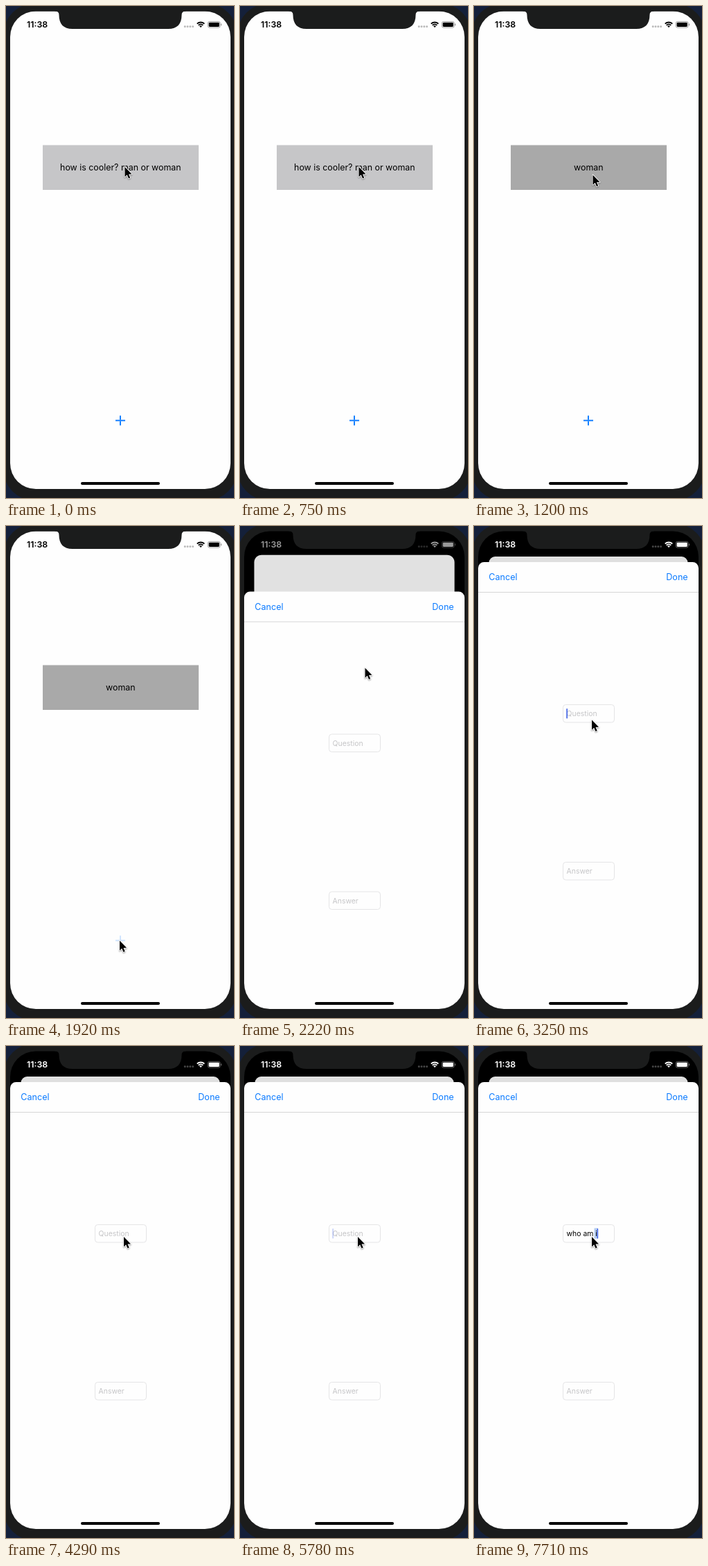
Recreate the animation shown at these times as an HTML page with a canvas. Size 329 px wide and 709 px high, loop 8 s.

```html
<!DOCTYPE html>
<html lang="en">
<head>
<meta charset="utf-8">
<title>Flashcards</title>
<style>
  html, body { margin: 0; width: 100%; height: 100%; overflow: hidden; background: #1b1c1c; }
  canvas { display: block; width: 329px; height: 709px; }
</style>
</head>
<body>
<canvas id="stage" width="329" height="709"></canvas>
<script>
const ctx = document.getElementById('stage').getContext('2d');
const LOOP = 8000;
const BEZEL = '#1b1c1c', WHITE = '#fefefe', BLUE = '#0a7aff';
const SCREEN = { x: 6, y: 7.5, w: 318, h: 688.5, r: 37 };
const SHEET_TOP = 52, SHEET_TRAVEL = 657;

// Stepped tracks: the last entry that has started applies.
const pointerTrack = [
  [0, 171, 231.5], [1200, 171, 243], [1350, 170, 315], [1500, 168, 430],
  [1650, 165, 540], [1770, 163.5, 590], [1920, 163.5, 597], [2070, 171, 400],
  [2220, 180, 204], [2370, 179, 212], [2520, 175, 240], [2670, 171, 266],
  [2800, 169.5, 277], [2950, 169.5, 279], [3400, 169.5, 276], [3550, 169.5, 274.5]
];
const cardTrack = [[0, false], [150, true], [750, false], [1050, true]];
const caretTrack = [
  [0, 0], [3250, 1], [3550, 0], [3840, 1], [4140, 0.4], [4290, 0],
  [4740, 0.4], [4890, 1], [5190, 0], [5780, 0.3], [5930, 1]
];
const typingTrack = [
  [0, ''], [5930, 'w'], [6380, 'wh'], [6680, 'who'], [6970, 'who '],
  [7120, 'who a'], [7420, 'who am'], [7570, 'who am '], [7710, 'who am i']
];

const at = (track, t) => track.filter(key => key[0] <= t).pop();
const clamp = v => Math.max(0, Math.min(1, v));

function box(x, y, w, h, r, color) {
  ctx.beginPath();
  ctx.roundRect(x, y, w, h, r);
  ctx.fillStyle = color;
  ctx.fill();
}

function label(text, x, y, size, color, align = 'left', weight = 400) {
  ctx.font = `${weight} ${size}px Inter, "Open Sans", sans-serif`;
  ctx.textAlign = align;
  ctx.fillStyle = color;
  ctx.fillText(text, x, y);
}

// Critically damped spring
function sheetProgress(t) {
  const s = Math.max(0, t - 1998.5) * 0.02;
  return 1 - Math.exp(-s) * (1 + s);
}

function drawHome(t, progress) {
  const scale = 1 - 0.0975 * progress;
  ctx.save();
  ctx.translate(165, SCREEN.y + 36.5 * progress);
  ctx.scale(scale, scale);
  ctx.translate(-165, -SCREEN.y);
  const radius = progress ? 10 + 27 * (1 - progress) : 0;
  box(SCREEN.x, SCREEN.y, SCREEN.w, SCREEN.h, radius, WHITE);

  const answered = at(cardTrack, t)[1];
  box(53, 200.5, 225, 64.5, 0, answered ? '#a9a9a9' : '#c6c6c8');
  label(answered ? 'woman' : 'how is cooler? man or woman', 165.3, 237.2, 12.4, '#000', 'center');

  ctx.globalAlpha = t >= 1920 ? 0.2 : 1;
  ctx.fillStyle = BLUE;
  ctx.fillRect(158, 596.4, 14, 1.9);
  ctx.fillRect(164, 590.3, 1.9, 6.1);
  ctx.fillRect(164, 598.3, 1.9, 6.1);
  ctx.globalAlpha = 1;

  box(SCREEN.x, SCREEN.y, SCREEN.w, SCREEN.h, radius, `rgba(0,0,0,${0.12 * progress})`);
  ctx.restore();
}

function drawField(y, text, color) {
  ctx.beginPath();
  ctx.roundRect(128.5, y + 0.5, 74, 25.5, 4);
  ctx.lineWidth = 1;
  ctx.strokeStyle = '#e5e5e6';
  ctx.stroke();
  label(text, 133.6, y + 17.3, 10.4, color);
}

function drawSheet(t, top) {
  box(SCREEN.x, top, SCREEN.w, 709, [8.5, 8.5, 0, 0], WHITE);
  ctx.fillStyle = '#d6d6d7';
  ctx.fillRect(SCREEN.x, top + 43, SCREEN.w, 1);
  label('Cancel', 21.3, top + 26.4, 12.6, BLUE);
  label('Done', 308.7, top + 26.4, 12.6, BLUE, 'right');

  const typed = at(typingTrack, t)[1];
  if (t >= 7710) box(173.5, top + 210.5, 5.5, 15, 0, '#b5cdf0');
  drawField(top + 205, typed || 'Question', typed ? '#000' : '#c5c5c7');
  drawField(top + 432, 'Answer', '#c5c5c7');

  ctx.globalAlpha = at(caretTrack, t)[1];
  ctx.font = '400 10.4px Inter, "Open Sans", sans-serif';
  const caretX = 133.3 + ctx.measureText(typed).width;
  box(caretX, top + 211, 1.7, 14.5, 0.8, '#4869e6');
  ctx.globalAlpha = 1;
}

function drawStatus(level) {
  const shade = Math.round(255 * level);
  const ink = `rgb(${shade},${shade},${shade})`;
  label('11:38', 30, 31.2, 12.4, ink, 'left', 600);

  ctx.globalAlpha = 0.27;
  for (let i = 0; i < 4; i++) box(256.8 + i * 3.8, 28.3, 2.8, 2.8, 1, ink);
  ctx.globalAlpha = 1;

  ctx.strokeStyle = ctx.fillStyle = ink;
  const from = -Math.PI * 0.75, to = -Math.PI * 0.25;
  ctx.lineWidth = 1.8;
  for (const r of [4.6, 7.5]) {
    ctx.beginPath();
    ctx.arc(281, 31, r, from, to);
    ctx.stroke();
  }
  ctx.beginPath();
  ctx.moveTo(281, 31);
  ctx.arc(281, 31, 2.6, from, to);
  ctx.fill();

  ctx.globalAlpha = 0.4;
  ctx.lineWidth = 0.9;
  ctx.beginPath();
  ctx.roundRect(291.3, 22.4, 17.8, 8.8, 2.4);
  ctx.stroke();
  box(309.9, 25.3, 1.2, 3, 0.6, ink);
  ctx.globalAlpha = 1;
  box(292.6, 23.7, 15.2, 6.2, 1.3, ink);
}

function drawNotch() {
  ctx.beginPath();
  ctx.moveTo(70, 7);
  ctx.lineTo(71, 7.5);
  ctx.quadraticCurveTo(76.5, 7.5, 76.5, 13);
  ctx.bezierCurveTo(76.5, 26, 83, 33, 96, 33);
  ctx.lineTo(234, 33);
  ctx.bezierCurveTo(247, 33, 253.5, 26, 253.5, 13);
  ctx.quadraticCurveTo(253.5, 7.5, 259, 7.5);
  ctx.lineTo(260, 7);
  ctx.closePath();
  ctx.fillStyle = BEZEL;
  ctx.fill();
}

function drawPointer(x, y) {
  ctx.save();
  ctx.translate(x, y);
  ctx.beginPath();
  ctx.moveTo(0.5, 0.5);
  for (const [px, py] of [[0.5, 14.7], [3.7, 11.7], [6, 17], [8.2, 16], [6, 11], [10.5, 10.8]]) {
    ctx.lineTo(px, py);
  }
  ctx.closePath();
  ctx.lineJoin = 'round';
  ctx.lineWidth = 1.8;
  ctx.strokeStyle = '#fff';
  ctx.shadowColor = 'rgba(0,0,0,0.4)';
  ctx.shadowBlur = 2;
  ctx.shadowOffsetY = 1;
  ctx.stroke();
  ctx.shadowColor = 'transparent';
  ctx.fillStyle = '#000';
  ctx.fill();
  ctx.restore();
}

function draw(t) {
  const [clock, x, y] = at(pointerTrack, t);
  const progress = sheetProgress(clock);

  ctx.fillStyle = '#14203a';
  ctx.fillRect(0, 0, 329, 709);
  box(-4, -4, 338, 717, 46, BEZEL);

  ctx.save();
  ctx.beginPath();
  ctx.roundRect(SCREEN.x, SCREEN.y, SCREEN.w, SCREEN.h, SCREEN.r);
  ctx.clip();
  ctx.fillStyle = '#000';
  ctx.fillRect(0, 0, 329, 709);
  drawHome(t, progress);
  if (progress > 0) drawSheet(t, SHEET_TOP + SHEET_TRAVEL * (1 - progress));
  drawStatus(clamp((clock - 2020) / 333));
  box(108, 686, 114, 4, 2, '#000');
  ctx.restore();

  drawNotch();
  drawPointer(x, y);
}

const start = performance.now();
function tick() {
  draw((performance.now() - start) % LOOP);
  requestAnimationFrame(tick);
}
tick();
</script>
</body>
</html>
```
